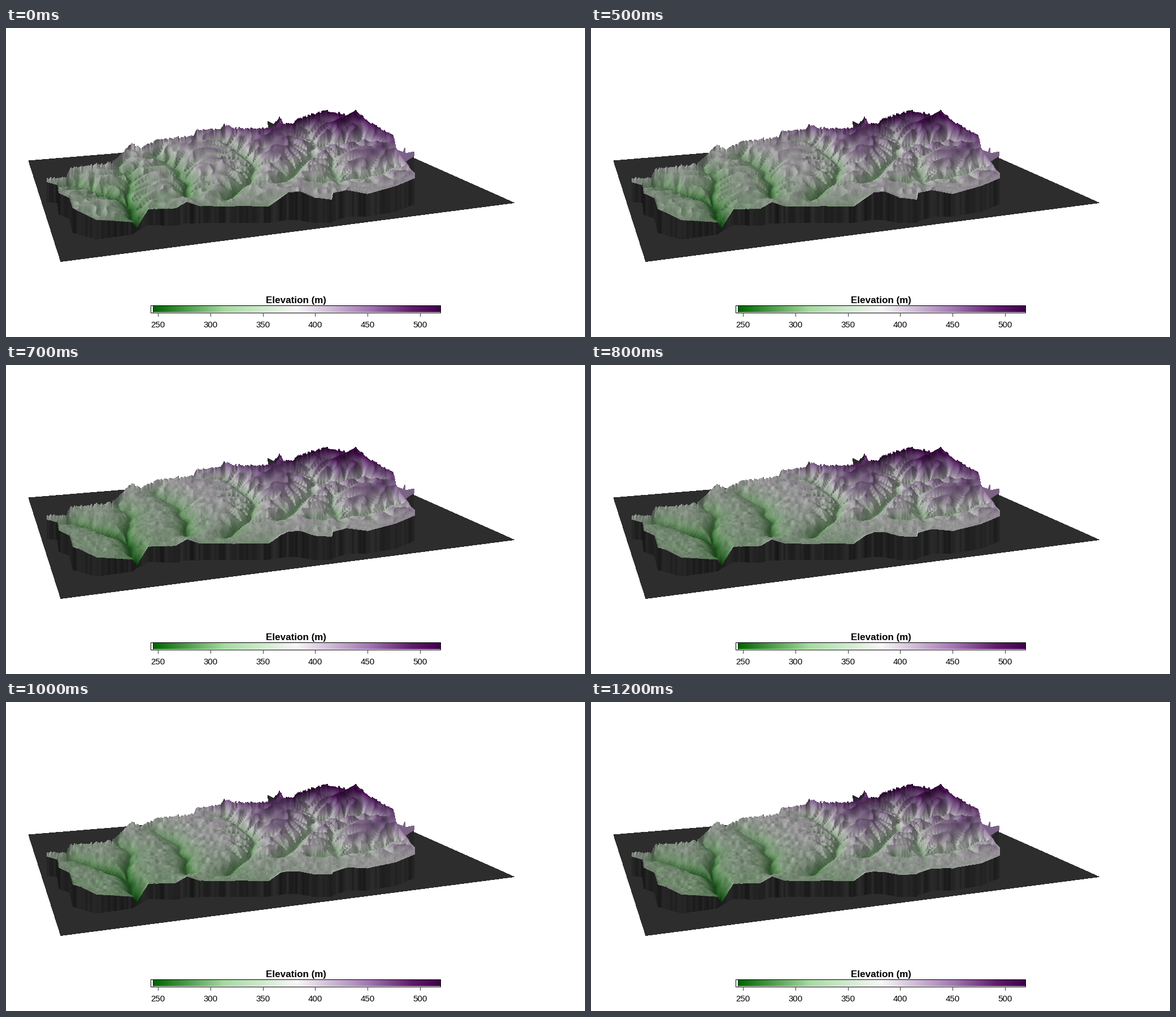
Recreate the animation shown at these times as a matplotlib script. Size 1025 by 547 pixels, loop 1700 ms.

```python
import numpy as np
import matplotlib.pyplot as plt
from matplotlib.animation import FuncAnimation
from matplotlib.colors import LinearSegmentedColormap
from matplotlib.patches import Polygon, Rectangle

W, H, DPI = 1025, 547, 128
PX = 72 / DPI
E_MIN, E_MAX, E_BASE = 245, 519, 225
STEPS = 9
SQUASH = 2.2                      # foreshortening of the ground plane
LIFT_0, LIFT_G = 0.05, 0.00063    # pixels per metre, growing towards the viewer

# Stage columns, ground rows (as seen on the flat plane) and screen rows.
xs = np.arange(66, 731)
gs = np.arange(184, 378, 0.5)
Y_TOP, Y_BOT = 135, 380
X, G = np.meshgrid(xs + 0.5, gs)

CMAP = LinearSegmentedColormap.from_list("elev", [
    (0, "#006400"), (0.25, "#a6dba0"), (0.5, "#f7f7f7"),
    (0.75, "#a277b3"), (0.9, "#5f1d6b"), (1, "#40004b")], N=512)

# Near edge: x, foot of the wall, rim on screen.
FRONT = [(72, 308, 272), (91, 311, 277), (93, 331, 291), (112, 338, 300),
         (118, 363, 318), (160, 375, 339), (224, 366, 343), (231, 361, 354),
         (252, 349, 320), (300, 351, 319), (320, 346, 307), (345, 346, 315),
         (466, 345, 315), (500, 340, 290), (520, 341, 288), (546, 346, 299),
         (577, 345, 303), (579, 343, 291), (603, 335, 286), (640, 334, 293),
         (690, 326, 279), (724, 312, 265)]

# Far edge: skyline on screen.
SKY = [(72, 267), (107, 262), (114, 247), (188, 237), (222, 204), (240, 210),
       (270, 196), (332, 190), (337, 180), (380, 178), (387, 169), (400, 176),
       (464, 177), (475, 171), (484, 156), (492, 169), (509, 169), (514, 160),
       (565, 145), (604, 154), (618, 145), (645, 166), (686, 190), (690, 210),
       (724, 259)]

# Main valleys on the ground plane, from mouth to head.
VALLEYS = [
    [(231, 361), (216, 333), (190, 320), (150, 309), (116, 300)],
    [(216, 333), (214, 311), (225, 290), (200, 270)],
    [(322, 322), (320, 298), (302, 274), (262, 250)],
    [(394, 327), (434, 292), (438, 272), (412, 248), (385, 228)],
    [(487, 301), (540, 258), (546, 238), (530, 212)],
    [(540, 300), (600, 300), (660, 292), (700, 278)],
    [(585, 300), (575, 277), (588, 257)],
    [(546, 238), (598, 237), (640, 232)],
]


def sigmoid(v):
    return 1 / (1 + np.exp(-np.clip(v, -50, 50)))


def lift(g):
    return LIFT_0 + LIFT_G * g


def crest(x, g):
    """Ridge elevation: rises away from the viewer, faster on the right."""
    c = 370 + (345 - g) * (0.3 + 0.75 * sigmoid((x - 400) / 60))
    return np.minimum(c - 14 * sigmoid((150 - x) / 20), 505)


def floor(x, g):
    """Valley elevation: rises with the distance from the outlet."""
    return 248 + 0.19 * np.hypot(x - 231, SQUASH * (g - 361))


def foot_of(x, y):
    """Ground row of a crest point seen at screen height y."""
    g = y + 45.0
    for _ in range(6):
        h = crest(x, g) - E_BASE
        g = (y + LIFT_0 * h) / (1 - LIFT_G * h)
    return g


def noise(sx, sg, seed):
    """Smooth value noise in -1..1 over the ground grid."""
    u, v = (X - X.min()) / sx, (G - G.min()) / sg
    i, j = u.astype(int), v.astype(int)
    cells = np.random.default_rng(seed).uniform(-1, 1, (j.max() + 2, i.max() + 2))
    fu, fv = u - i, v - j
    fu, fv = fu * fu * (3 - 2 * fu), fv * fv * (3 - 2 * fv)
    near = cells[j, i] * (1 - fu) + cells[j, i + 1] * fu
    far = cells[j + 1, i] * (1 - fu) + cells[j + 1, i + 1] * fu
    return near * (1 - fv) + far * fv


def trace(line, step):
    """Evenly spaced points along a polyline, in unsquashed coordinates."""
    pts = np.array(line, float) * (1, SQUASH)
    length = np.r_[0, np.cumsum(np.hypot(*np.diff(pts, axis=0).T))]
    at = np.linspace(0, length[-1], max(int(length[-1] / step), 2) + 1)
    return np.column_stack([np.interp(at, length, c) for c in pts.T])


def relief():
    """Height between valley floor (0) and crest (1), with and without side valleys."""
    rng = np.random.default_rng(21)
    wx = X + 5 * noise(20, 10, 1)
    wg = SQUASH * (G + 2 * noise(20, 10, 2))

    def carve(field, points, rise, width):
        for (px, pg), s in zip(points, rise):
            d = np.sqrt((wx - px) ** 2 + (wg - pg) ** 2)
            np.minimum(field, s + (1 - s) * np.tanh(d / width), out=field)

    broad = np.ones(X.shape)
    for line in VALLEYS:
        pts = trace(line, 6)
        carve(broad, pts, 0.35 * np.linspace(0, 1, len(pts)) ** 2, 22)

    fine = broad.copy()
    for line in VALLEYS:
        pts = trace(line, 13)
        for n in range(1, len(pts)):
            ahead = pts[n] - pts[n - 1]
            turn = (1 if n % 2 else -1) * rng.uniform(0.9, 1.4)
            angle = np.arctan2(ahead[1], ahead[0]) + turn
            reach = np.linspace(0.1, 1, 7)[:, None] * rng.uniform(32, 52)
            branch = pts[n] + reach * (np.cos(angle), np.sin(angle))
            rise = np.linspace(0.15, 0.7, 7)
            carve(fine, branch, rise, 15)
    return fine, broad


def build_terrain():
    x = xs + 0.5
    fx, fy, rim = np.array(FRONT).T
    foot, rim0 = np.interp(x, fx, fy), np.interp(x, fx, rim)
    rim1 = np.maximum(rim0 + 1, foot - 41)

    sky = np.interp(x, *np.array(SKY).T)
    back = foot_of(x, sky)
    jag = np.repeat(np.random.default_rng(8).normal(0, 1, len(x) // 3 + 1), 3)
    sky0 = sky + jag[:len(x)]
    sky1 = sky0 + 8 * sigmoid((370 - x) / 12) * np.clip((x - 85) / 60, 0, 1)
    land = (G >= back) & (G <= foot) & (x >= 72) & (x <= 724)

    fine, broad = relief()
    ridges = np.abs(noise(17, 9, 5))
    lumps = noise(15, 6, 6) + 0.7 * noise(7, 3.5, 7)
    low = floor(X, G)
    span = np.maximum(crest(X, G) - low, 15)
    start = low + span * fine * (1.02 - 0.3 * ridges)
    end = low + span * broad * (0.68 + 0.09 * lumps)
    worn = np.maximum(sigmoid((388 - X) / 8), sigmoid((G - 310) / 4))
    end = start + (end - start) * worn

    def pin(elev, near_rim, far_rim):
        near_e = E_BASE + (foot - near_rim) / lift(foot)
        far_e = E_BASE + (back - far_rim) / lift(back)
        elev = elev + (near_e - elev) * np.exp(-np.clip(foot - G, 0, 99) / 6)
        return elev + (far_e - elev) * np.exp(-np.clip(G - back, 0, 99) / 3)

    return land, pin(start, rim0, sky0), pin(end, rim1, sky1)


LAND, START, END = build_terrain()
GRAIN = 0.03 * noise(2, 4, 10)
WALL = 0.135 + 0.03 * (noise(4, 400, 11) + 0.7 * noise(11, 400, 12))[0]
DELAY = 0.6 * np.clip((xs - 300) / 400, 0, 1)


def render(u):
    """Paint the terrain from the far rows to the near ones."""
    # The wearing down travels from left to right.
    elev = START + (END - START) * np.clip(1.6 * u - DELAY, 0, 1)
    top = G - lift(G) * (elev - E_BASE)
    slope = np.gradient(elev, axis=1)
    shade = np.clip(0.6 + 0.24 * np.tanh(slope / 5) + GRAIN, 0.3, 0.86)
    color = CMAP((elev - E_MIN) / (E_MAX - E_MIN))[..., :3] * shade[..., None]

    rows = len(gs)
    owner = np.full((Y_BOT - Y_TOP, len(xs)), -1)
    ys = np.arange(Y_TOP, Y_BOT)[:, None] + 0.5
    for r in range(rows - 1):
        live, following = LAND[r], LAND[r + 1]
        if not live.any():
            continue
        a = max(int(top[r][live].min()) - Y_TOP - 1, 0)
        b = min(int(gs[r]) - Y_TOP + 2, Y_BOT - Y_TOP)
        y, part = ys[a:b], owner[a:b]
        under = top[r] + 1
        under = np.where(following, np.maximum(top[r + 1], under), under)
        np.copyto(part, r, where=live & (y >= top[r]) & (y < under))
        edge = live & ~following
        if edge.any():
            np.copyto(part, rows, where=edge & (y >= under) & (y < gs[r]))

    image = np.zeros(owner.shape + (4,))
    cols = np.broadcast_to(np.arange(len(xs)), owner.shape)
    image[..., :3] = color[np.clip(owner, 0, rows - 1), cols]
    wall = owner == rows
    image[wall, :3] = WALL[cols[wall], None]
    image[..., 3] = owner >= 0
    return np.clip(image, 0, 1)


images = [render(n / STEPS) for n in range(STEPS + 1)]

fig = plt.figure(figsize=(W / DPI, H / DPI), dpi=DPI, facecolor="white")
ax = fig.add_axes([0, 0, 1, 1])
ax.axis("off")


def patch(points, color, z):
    ax.add_patch(Polygon(points, closed=True, fc=color, ec="none", lw=0,
                         antialiased=False, zorder=z))


patch([(40, 235), (97, 413.5), (899.5, 309.5), (624, 187)], "#2d2d2d", 1)
terrain = ax.imshow(images[0], extent=(xs[0], xs[-1] + 1, Y_BOT, Y_TOP),
                    interpolation="nearest", aspect="auto", zorder=3)

# Back of the far wall and the torn right rim.
patch([(463, 165), (474, 171), (478, 165), (492, 172), (465, 176)], "#2b262d", 2)
patch([(712, 230), (722, 227), (722, 265), (712, 243)], "#262626", 2)
patch([(692, 216), (703, 220), (706, 212), (707, 222), (722, 219), (723, 226),
       (707, 236)], "#7b6386", 4)

# Legend.
ax.imshow(np.linspace(0, 1, 512)[None], cmap=CMAP, extent=(260, 769, 503, 491),
          aspect="auto", zorder=3)
ax.add_patch(Rectangle((256, 490.5), 512.5, 13, fill=False, ec="black",
                       lw=PX, zorder=5))
ax.plot([259.5, 259.5], [491, 503], color="black", lw=0.6 * PX, zorder=5)
for n in range(6):
    x = 269 + 92.8 * n
    ax.plot([x, x], [504, 510], color="#333333", lw=PX, zorder=5)
    ax.text(x, 530, str(250 + 50 * n), ha="center", va="baseline",
            family="Liberation Sans", size=15 * PX)
ax.text(513, 487, "Elevation (m)", ha="center", va="baseline", weight="bold",
        family="Liberation Sans", size=17 * PX, zorder=6)

ax.set_xlim(0, W)
ax.set_ylim(H, 0)


def update(i):
    terrain.set_data(images[min(max(i - 3, 0), STEPS)])
    return [terrain]


anim = FuncAnimation(fig, update, frames=17, interval=100, repeat=True,
                     repeat_delay=0, blit=False)
plt.show()
```
